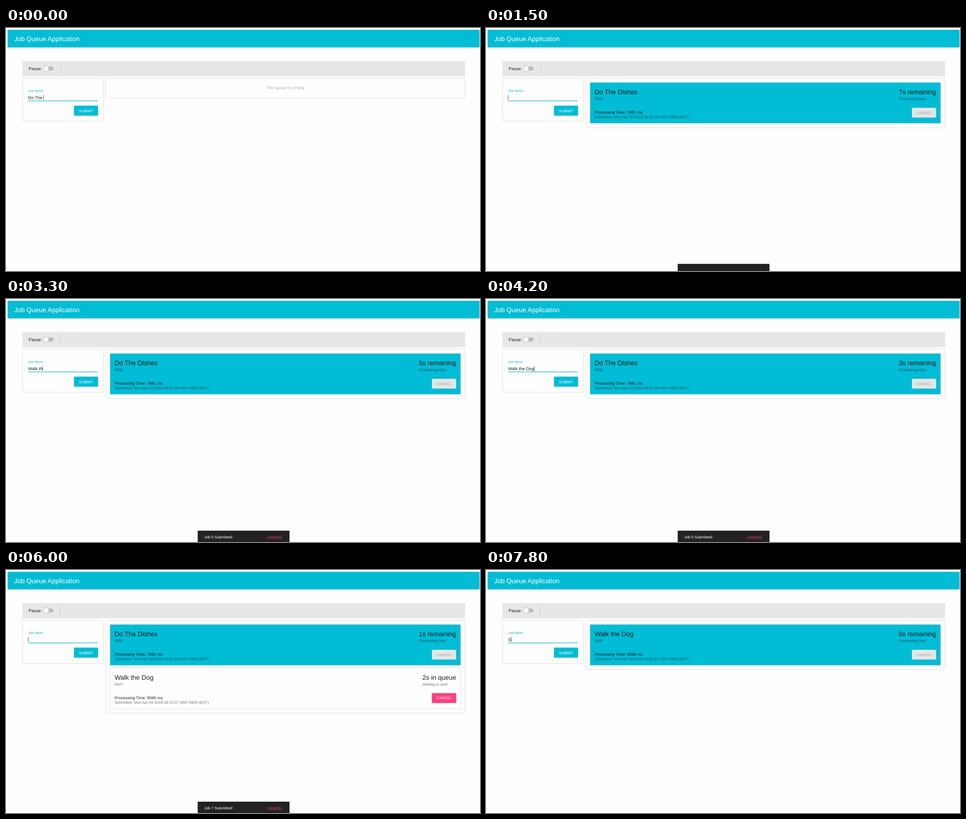
Animation of 1045 by 536 pixels, one loop 8 s. Source, as an HTML page:

```html
<!DOCTYPE html>
<html lang="en">
<head>
<meta charset="utf-8">
<title>Job Queue Application</title>
<style>
  html, body { margin: 0; width: 100%; height: 100%; overflow: hidden; background: #fefefe; }
  svg { display: block; width: 1045px; height: 536px; }
  text { font-family: "Liberation Sans", Arial, sans-serif; font-size: 8.4px; fill: #000;
         fill-opacity: .87; text-rendering: geometricPrecision; }
  .big { font-size: 14.4px; }
  .mid { font-size: 9.6px; }
  .time { font-size: 9px; }
  .soft { fill-opacity: .54; }
  .faint { fill-opacity: .3; }
  .light { fill: #fff; fill-opacity: 1; }
  .center { text-anchor: middle; }
  .paper { fill: #fefefe; }
  .cyan { fill: #00bcd4; }
  .pink { fill: #ff4081; fill-opacity: 1; }
  .off { fill: #e5e5e5; }
  .raised { filter: drop-shadow(0 .6px 1.6px rgba(0,0,0,.14)) drop-shadow(0 .6px 1px rgba(0,0,0,.15)); }
</style>
</head>
<body>
<svg viewBox="0 0 1045 536">
  <rect class="cyan raised" x="3.8" y="4.2" width="1040" height="38.4"/>
  <text class="big light" x="18" y="28.7">Job Queue Application</text>

  <rect x="35.8" y="73" width="976.4" height="33.6" fill="#e7e7e7"/>
  <text class="mid" x="50" y="93">Pause</text>
  <rect x="83.4" y="85" width="21.6" height="8.4" rx="4.2" fill="#bdbdbd"/>
  <circle class="raised" cx="88.4" cy="89.2" r="6" fill="#f5f5f5"/>
  <rect x="119.7" y="80" width=".7" height="19.4" fill-opacity=".2"/>

  <rect class="paper raised" x="36.8" y="111.6" width="178" height="93.4" rx="1.2"/>
  <text x="48.8" y="140.7" style="font-size:7.2px;fill:#00bcd4;fill-opacity:1">Job Name</text>
  <text id="field" class="mid" x="48.8" y="156.7" xml:space="preserve"></text>
  <rect id="caret" y="148" width=".8" height="10.6" fill-opacity=".87"/>
  <rect x="48.8" y="160.2" width="154" height="1.2" fill="#0cb0c5"/>
  <rect class="cyan raised" x="150" y="171.6" width="52.8" height="21.6" rx="1.2"/>
  <text class="light center" x="176.4" y="185.5">SUBMIT</text>

  <rect id="panel" class="paper raised" x="221" y="111.6" width="790.2" rx="1.2"/>
  <g id="jobs"></g>

  <g id="snack">
    <rect x="422.6" y="511" width="202.4" height="28.8" rx="1.2" fill="#222"/>
    <g id="note">
      <text id="msg" class="light" x="437" y="528"></text>
      <text class="pink" x="576" y="528.9">CANCEL</text>
    </g>
  </g>
</svg>
<script>
const LOOP = 8000, STEP = 100, SPEED = 1.5, CARD_PITCH = 95.8;
const $ = id => document.getElementById(id);

const dishes = { name: 'Do The Dishes', id: 6, ms: 7861, sec: 34 };
const dog = { name: 'Walk the Dog', id: 7, ms: 9566, sec: 37 };

// Key lists hold [start time, value] pairs; each value lasts until the next one.
const typed = [[0, 'Do The '], [300, 'Do The D'], [400, 'Do The Di'], [600, 'Do The D'],
  [700, 'Do The Di'], [800, 'Do The Dis'], [900, 'Do The Dish'], [1000, 'Do The Dishe'],
  [1300, dishes.name], [1500, ''], [2500, 'W'], [2700, 'Wa'], [2800, 'Wal'], [2900, 'Walk'],
  [3100, 'Walk '], [3200, 'Walk t'], [3300, 'Walk th'], [3400, 'Walk the'], [3500, 'Walk the '],
  [3800, 'Walk the D'], [3900, 'Walk the Do'], [4100, dog.name], [4400, ''], [7800, 'S']];
const left = [[0, 7], [2300, 6], [2900, 5], [3700, 4], [4200, 3], [5000, 2], [5700, 1],
  [6200, 0], [6500, 9], [6900, 8], [7300, 7], [7700, 6]];
const waited = [[0, 0], [5600, 1], [6000, 2], [6400, 3]];
const queue = [[0, []], [1500, [dishes]], [4400, [dishes, dog]], [6500, [dog]]];
const caretOff = [[1900, 2200], [5300, 5600], [6300, 6700], [7300, 7500]];
const notes = [{ id: 6, open: 1446, close: 4380 }, { id: 7, open: 4853, close: 6580 }];

const at = (keys, t) => keys.filter(k => k[0] <= t).pop()[1];
const clamp = v => Math.min(1, Math.max(0, v));
const easeOut = p => 1 - (1 - clamp(p)) ** 5;
const text = (x, y, cls, s) => `<text x="${x}" y="${y}" class="${cls}">${s}</text>`;
const box = (x, y, w, h, cls) =>
  `<rect x="${x}" y="${y}" width="${w}" height="${h}" rx="1.2" class="${cls}"/>`;

function card(job, i, t) {
  const active = i === 0, x = active ? 910 : 918;
  const status = active ? at(left, t) + 's remaining' : at(waited, t) + 's in queue';
  return `<g transform="translate(0 ${i * CARD_PITCH})">` +
    box(229.6, 120.6, 772.4, 89.4, (active ? 'cyan' : 'paper') + ' raised') +
    text(239.4, 145.9, 'big', job.name) +
    text(239.4, 159.4, 'soft', '000' + job.id) +
    text(239.4, 188.8, 'time', `Processing Time: ${job.ms} ms`) +
    text(239.4, 198.9, 'soft', `Submitted: Mon Apr 09 2018 18:10:${job.sec} GMT-0400 (EDT)`) +
    text(x, 145.9, 'big', status) +
    text(x, 159.4, 'soft', active ? 'Processing Now' : 'Waiting to start') +
    box(939, 175.9, 53.4, 21.6, active ? 'off' : 'pink raised') +
    text(965.7, 189.6, 'center ' + (active ? 'faint' : 'light'), 'CANCEL') + '</g>';
}

function drawSnack(t) {
  const note = notes.filter(n => n.open <= t).pop();
  $('snack').style.display = note ? '' : 'none';
  if (!note) return;
  const inMs = (t - note.open) * SPEED, outMs = (t - note.close) * SPEED;
  const shown = easeOut(inMs / 400) - easeOut(outMs / 400);
  $('snack').setAttribute('transform', `translate(0 ${28.8 * (1 - shown)})`);
  $('note').setAttribute('opacity', easeOut((inMs - 100) / 500) * (1 - easeOut(outMs / 400)));
  $('msg').textContent = `Job ${note.id} Submitted!`;
}

function draw(t) {
  const field = $('field'), jobs = at(queue, t);
  field.textContent = at(typed, t);
  $('caret').setAttribute('x', 48.6 + (field.textContent ? field.getComputedTextLength() : 0));
  $('caret').style.display = caretOff.some(([a, b]) => t >= a && t < b) ? 'none' : '';
  $('panel').setAttribute('height', jobs.length ? 11.8 + jobs.length * CARD_PITCH : 41.6);
  $('jobs').innerHTML = jobs.length
    ? jobs.map((job, i) => card(job, i, t)).join('')
    : text(615.9, 135.3, 'mid faint center', 'The queue is empty');
  drawSnack(t);
}

const start = performance.now();
let last = -1;
function tick() {
  const t = Math.floor((performance.now() - start) % LOOP / STEP) * STEP;
  if (t !== last) draw(last = t);
  requestAnimationFrame(tick);
}
tick();
</script>
</body>
</html>
```
